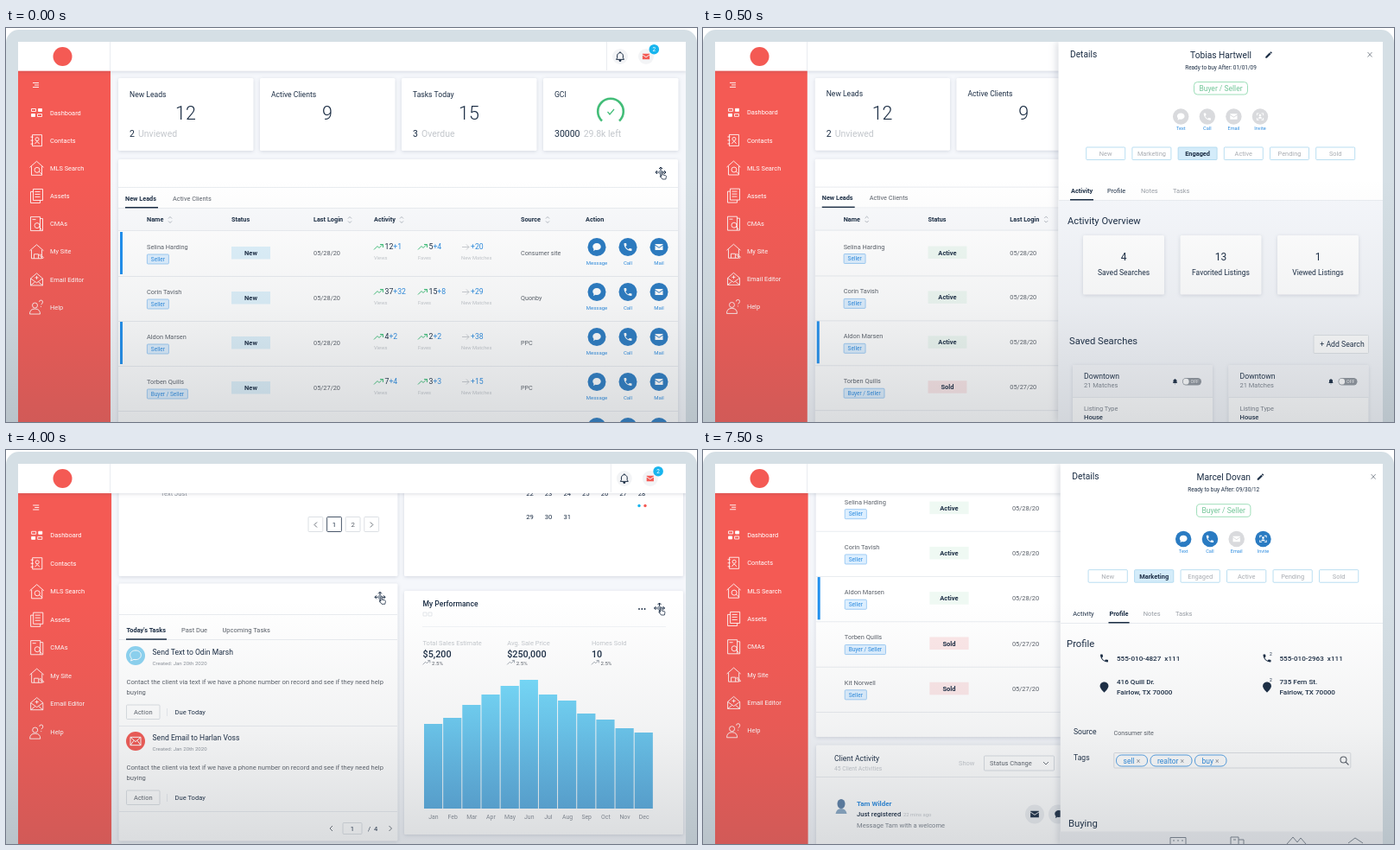
Recreate the animation shown at these times as an HTML page. Size 800x456 px, loop 8000 ms.

```html
<!DOCTYPE html>
<html lang="en">
<head>
<meta charset="utf-8">
<title>CRM dashboard</title>
<style>
  html, body { margin: 0; width: 100%; height: 100%; overflow: hidden; background: #fff; }
  svg { display: block; width: 800px; height: 456px; font-family: Roboto, sans-serif; }
  text { white-space: pre; }
  .card { filter: drop-shadow(0 1px 2px #25355528); }
  .panel { filter: drop-shadow(-2px 0 4px #25355530); }
</style>
</head>
<body>
<svg viewBox="0 0 800 456">
  <defs>
    <clipPath id="screen"><rect x="14" y="16" width="773" height="440"/></clipPath>
    <linearGradient id="shade" x2="0" y2="1">
      <stop offset=".38" stop-color="#505a64" stop-opacity="0"/>
      <stop offset=".7" stop-color="#505a64" stop-opacity=".075"/>
      <stop offset="1" stop-color="#505a64" stop-opacity=".21"/>
    </linearGradient>
    <linearGradient id="bars" gradientUnits="userSpaceOnUse" x1="0" y1="266" x2="0" y2="415">
      <stop stop-color="#76dbfb"/><stop offset="1" stop-color="#58abdf"/>
    </linearGradient>
  </defs>
  <rect y="2" width="800" height="470" rx="15" fill="#d5dfe5"/>
  <g id="stage" clip-path="url(#screen)"></g>
  <rect y="2" width="800" height="454" fill="url(#shade)"/>
</svg>
<script>
const INK = '#1b2d44', BODY = '#5a6069', PALE = '#c3c7cc', BLUE = '#2b8be0', DISC = '#2a7bc2',
      RED = '#f45a54', GREEN = '#3fbf78', EDGE = '#e9ecf0', SKY = '#a9d6ee', PAGE = '#f5f7fb';

// ---- drawing helpers ----
const text = (x, y, s, size = 7.4, fill = INK, weight = 400, anchor = 'start') =>
  `<text x="${x}" y="${y}" font-size="${size}" fill="${fill}" font-weight="${weight}" text-anchor="${anchor}">${s}</text>`;
const mid = (x, y, s, size, fill, weight) => text(x, y, s, size, fill, weight, 'middle');
const rect = (x, y, w, h, fill, more = '') =>
  `<rect x="${x}" y="${y}" width="${w}" height="${h}" fill="${fill}" ${more}/>`;
const box = (x, y, w, h, fill, stroke, rx = 1) =>
  rect(x, y, w, h, fill, `stroke="${stroke}" stroke-width=".8" rx="${rx}"`);
const card = (x, y, w, h) => rect(x, y, w, h, '#fff', 'class="card" rx="1.5"');
const disc = (x, y, r, fill) => `<circle cx="${x}" cy="${y}" r="${r}" fill="${fill}"/>`;
const line = (d, stroke = EDGE, width = 1) =>
  `<path d="${d}" fill="none" stroke="${stroke}" stroke-width="${width}"/>`;
const at = (x, y, body, k = 1) => `<g transform="translate(${x} ${y}) scale(${k})">${body}</g>`;
const zoom = (k, body, dy = 0) =>
  `<g transform="translate(14 ${16 + dy}) scale(${k}) translate(-14 -16)">${body}</g>`;
const each = (list, fn) => list.map(fn).join('');

// Icons on a 24-unit grid
const ICONS = {
  chat: 'M12 3c5.500 0 9.500 3.500 9.500 8s-4 8-9.500 8c-1 0-2-.1-3-.4L4 21l1-4.200C3.500 15 2.500 13 2.500 11 2.500 6.500 6.500 3 12 3z',
  phone: 'M6.600 10.800c1.400 2.800 3.800 5.100 6.600 6.600l2.200-2.200c.3-.3.7-.4 1-.2 1.100.4 2.300.6 3.600.6.500 0 1 .4 1 1V20c0 .5-.5 1-1 1C10.600 21 3 13.400 3 4c0-.5.5-1 1-1h3.500c.5 0 1 .5 1 1 0 1.200.2 2.400.6 3.600.1.300 0 .7-.3 1z',
  mail: 'M3 5h18v1.500l-9 6-9-6zM3 8.500l9 6 9-6V19H3z',
  envelope: 'M3 5h18v14H3zM3 5l9 8 9-8M3 19l6-8M21 19l-6-8',
  pin: 'M12 1c-5.500 0-9 4-9 8.500C3 15.500 12 23 12 23s9-7.500 9-13.500C21 5 17.500 1 12 1z',
  pencil: 'M3 17.200V21h3.800L17.800 9.900l-3.700-3.700zM20.700 7a1 1 0 0 0 0-1.400l-2.300-2.300a1 1 0 0 0-1.400 0l-1.900 1.800 3.800 3.800z',
  bell: 'M4 18h16l-2-3v-5c0-3-2.500-5-5-5.300V3h-2v1.700C8.500 5 6 7 6 10v5zM10 20h4a2 2 0 0 1-4 0z',
  invite: 'M3 3h6v2H5v4H3zM15 3h6v6h-2V5h-4zM3 15h2v4h4v2H3zM19 15h2v6h-6v-2h4zM12 6a3 3 0 1 1 0 6 3 3 0 0 1 0-6zM7 17c0-5 10-5 10 0z'
};
const icon = (name, x, y, size, fill) =>
  at(x - size / 2, y - size / 2, `<path d="${ICONS[name]}" fill="${fill}"/>`, size / 24);
const outline = (name, x, y, size, stroke) =>
  at(x - size / 2, y - size / 2, line(ICONS[name], stroke, 24 / size), size / 24);

const dragCursor = (x, y) => at(x, y,
  line('M-6 0H6M0-6V6', INK, 1.1) + line('M-4-2L-6 0l2 2M4-2L6 0 4 2M-2-4L0-6l2 2', INK, 1) +
  disc(0, 0, 2.6, '#9aa4b0') +
  '<path d="M1 0c0-1 1.600-1 1.600 0v3l3 .6q1 .4.8 1.600L5.800 8H2L-.6 4.500q.3-1.200 1.600 0z" fill="#fff" stroke="#1b2d44" stroke-width=".8"/>');

// ---- shared chrome ----
const HOUSE = 'M-8-1L0-8 8-1M-6-2V8H6V-2';
const LENS = 'M3.500 2a3 3 0 1 1-6 0 3 3 0 0 1 6 0M3 4l3 3';
const MENU = [
  ['Dashboard', 'M-6-4.500h5v3h-5zM2-4.500h4v3H2zM-6 1.500h4v3h-4zM1 1.500h5v3H1z'],
  ['Contacts', 'M-5-6.500H6v13H-5zM-7-4h3M-7 0h3M-7 4h3M2.500-1.500a2 2 0 1 1-4 0 2 2 0 0 1 4 0M-2 4q2.500-5 5 0'],
  ['MLS Search', HOUSE + LENS],
  ['Assets', 'M-4-8H7V5H-4zM-4-5h-3V8H4V5M-2-5h6M-2-2h6M-2 1h6'],
  ['CMAs', 'M-7-8H4V8H-7zM4-6h3V8H4M-5-5h4' + LENS],
  ['My Site', HOUSE + 'M-3 8V3h5v5M3 4l4 4 1-1-4-4z'],
  ['Email Editor', 'M-7-1L0-7l7 6V7H-7zM-7-1l7 5 7-5M-7 7l5-4M7 7L2 3M-2-2h4M0-4v4'],
  ['Help', 'M1-2a3 3 0 1 1-6 0 3 3 0 0 1 6 0M-8 8q0-6 6-6t6 6zM3-6q0-2 2-2t2 2-2 3M5-1v1']
];

const sidebar = k => zoom(k,
  rect(14, 49, 107, 420, RED) + line('M31 63.500h7M33 66h5M31 68.500h7', '#fff', .9) +
  each(MENU, ([name, d], i) => {
    const y = 98 + 32.15 * i;
    return at(35.5, y, line(d, '#fff', .85)) + text(51, y + 2.6, name, 7.4, '#fff') +
      (i ? '' : rect(37.5, y - 4.5, 4, 3, '#fff') + rect(29.5, y + 1.5, 4, 3, '#fff'));
  }));

const header = (k, dx = 0) =>
  rect(14, 16, 774, 33.7 * k, '#fff', 'class="card"') + line('M120.500 16v33') + disc(65.5, 33, 11, RED) +
  line(`M${695.5 + dx} 16v33`) +
  at(dx, 0, disc(711, 33, 9, '#f3f4f6') + outline('bell', 711, 33, 13.5, INK) +
    disc(741, 33, 9, '#f3f4f6') + icon('mail', 741, 33, 11, RED) +
    disc(750.3, 24.7, 5.8, '#18b5ee') + mid(750.3, 27.2, '2', 6.5, '#fff'));

const screen = (k, page, dx) => rect(14, 16, 774, 440, PAGE) + page + sidebar(k) + header(k, dx);

// ---- leads page ----
const LEADS = [
  ['Selina Harding', 'Seller', '05/28/20', 'Consumer site', 12, 1, 5, 4, 20],
  ['Corin Tavish', 'Seller', '05/28/20', 'Quonby', 37, 32, 15, 8, 29],
  ['Aldon Marsen', 'Seller', '05/28/20', 'PPC', 4, 2, 2, 2, 38],
  ['Torben Quills', 'Buyer / Seller', '05/27/20', 'PPC', 7, 4, 3, 3, 15],
  ['Kit Norwell', 'Seller', '05/27/20', 'PPC', 6, 2, 4, 1, 12]
];
const STATUS = { New: '#def1fb', Active: '#eff9f3', Sold: '#fce7e8' };
const ACTIONS = [['chat', 'Message'], ['phone', 'Call'], ['mail', 'Mail']];

const trend = (x, y, k = 1) => at(x, y, line('M0 3L4-1l2 2 4-4M7-3h3.500V.5', k < 1 ? '#8c949e' : GREEN, 1), k);
const gain = (x, y, total, plus, label) =>
  trend(x, y) + text(x + 12.5, y + 2.5, `${total}<tspan fill="${BLUE}">+${plus}</tspan>`, 8.7) +
  text(x, y + 14.5, label, 5.8, PALE);

const lead = ([name, role, date, source, views, v, faves, f, matches], i, status, marked) => {
  const tagWidth = role === 'Seller' ? 25 : 47;
  return at(0, 52 * i,
    line('M130 287.500h648') + (marked ? rect(132, 236, 3, 49, '#1f8fee') : '') +
    text(163, 256, name, 7.4, BODY) +
    box(163.4, 262, tagWidth, 11, '#ddefff', '#8cc2f3') + mid(163.4 + tagWidth / 2, 269.8, role, 6.5, BLUE) +
    rect(261, 253, 45, 14.5, STATUS[status]) + mid(283.5, 263, status, 7.5, INK, 700) +
    text(356, 263, date, 7.4, BODY) +
    gain(426, 253.5, views, v, 'Views') + gain(477, 253.5, faves, f, 'Faves') +
    line('M528 253.500h8m-3-3l3 3-3 3', PALE, .9) + text(538, 256, '+' + matches, 8.7, BLUE) +
    text(527, 268, 'New Matches', 5.8, PALE) + text(596, 263, source, 7.2, BODY) +
    each(ACTIONS, ([kind, label], n) => {
      const x = 684 + 36 * n;
      return disc(x, 253.5, 10.5, DISC) + icon(kind, x, 253.5, 12, '#fff') + mid(x, 274, label, 6, BLUE);
    }));
};

const tile = (x, title, count, extra = '', note = '') =>
  card(x, 58, 156.5, 84) + text(x + 13, 79.5, title, 8.6) + mid(x + 78, 106, count, 21.5, INK, 300) +
  text(x + 13, 126, `${extra} <tspan dx="1.5" fill="${PALE}">${note}</tspan>`, 10.5);

function leadsPage(statuses, marked) {
  const columns = [[163, 'Name', 190], [261, 'Status'], [356, 'Last Login', 398],
    [426, 'Activity', 458], [596, 'Source', 627], [671, 'Action']];
  return tile(130, 'New Leads', '12', '2', 'Unviewed') + tile(294, 'Active Clients', '9') +
    tile(458, 'Tasks Today', '15', '3', 'Overdue') + tile(622, 'GCI', '', '30000', '29.8k left') +
    line('M690 107.500A14.800 14.800 0 1 1 710 107.500', '#43bd78', 2.6) + line('M696.500 97l2.500 3 5-6', '#43bd78', 1.2) +
    card(130, 152, 648, 372) + line('M130 184.500h648M130 208.500h648') +
    text(138, 199.5, 'New Leads', 7.3, INK, 700) + text(193, 199.5, 'Active Clients', 7.4, BODY) +
    rect(138, 207, 38, 1.5, INK) + rect(130, 209, 648, 26, '#f9fafc') + line('M130 234.500h648') +
    each(columns, ([x, name, sort]) => text(x, 224, name, 7.3, INK, 700) +
      (sort ? line(`M${sort - 2} 220.500l2-2 2 2M${sort - 2} 223.500l2 2 2-2`, '#a9afb8', .9) : '')) +
    each(LEADS, (row, i) => lead(row, i, statuses[i], marked.includes(i)));
}

// ---- client panel ----
function clientPanel(name, pencilX, date, activeContacts, stage, tab) {
  const stages = ['New', 'Marketing', 'Engaged', 'Active', 'Pending', 'Sold'];
  const tabs = [['Activity', 426, 25], ['Profile', 468, 22], ['Notes', 507, 19], ['Tasks', 544, 19]];
  const contacts = [['chat', 'Text'], ['phone', 'Call'], ['mail', 'Email'], ['invite', 'Invite']];
  return rect(411.5, 16, 380, 440, '#fff', 'class="panel"') + line('M412 199.500h376') +
    text(425, 33.7, 'Details', 10.2) + mid(599.5, 34.7, name, 10.2) + icon('pencil', pencilX, 31, 10, INK) +
    line('M769.500 28l5 5.500m0-5.500l-5 5.500', '#7c848e', .9) +
    mid(599.5, 47.8, 'Ready to buy After: ' + date, 6.45) +
    box(568.5, 62.5, 62, 14.5, '#fff', '#86d6a8', 4) + mid(599.5, 72.8, 'Buyer / Seller', 8.5, '#72c698') +
    each(contacts, ([kind, label], i) => {
      const x = 553.2 + 30.6 * i;
      return disc(x, 102.5, 9.2, activeContacts.includes(i) ? DISC : '#d9dadd') +
        icon(kind, x, 102.5, 11, '#fff') + mid(x, 118.3, label, 5.6, BLUE);
    }) +
    each(stages, (s, i) => {
      const x = 466.2 + 53.2 * i, on = s === stage;
      return box(x - 22.5, 138, 45, 14.5, on ? '#d4ecfa' : '#fff', SKY) +
        mid(x, 148, s, 7.4, on ? INK : '#a7abb1', on ? 700 : 400);
    }) +
    each(tabs, ([s, x, w], i) => text(x, 190.7, s, 7.4, i < 2 ? INK : '#989da5', s === tab ? 700 : 400) +
      (s === tab ? rect(x - 1, 198, w + 2, 1.5, INK) : ''));
}

const savedSearch = x => card(x, 390, 162, 90) + rect(x, 390, 162, 37, '#f7f8fb') + line(`M${x} 427.500h162`) +
  text(x + 13, 405.5, 'Downtown', 8.7) + text(x + 13, 416, '21 Matches', 7.5, '#7b828c') +
  icon('bell', x + 118.5, 409, 8, INK) + rect(x + 127, 405, 22, 8.5, '#8f959d', 'rx="4.2"') +
  disc(x + 131.2, 409.2, 3.4, '#fff') + text(x + 136.5, 411.4, 'OFF', 5.3, '#fff') +
  text(x + 13, 442.5, 'Listing Type', 7.4, '#7b828c') + text(x + 13, 453, 'House', 7.6, INK, 500);

const activityTab = () =>
  rect(411.5, 200, 380, 256, PAGE) + text(422, 226.5, 'Activity Overview', 11.2) +
  each([['4', 'Saved Searches'], ['13', 'Favorited Listings'], ['1', 'Viewed Listings']], ([n, label], i) => {
    const x = 440 + 112.5 * i;
    return card(x, 240, 94, 68.5) + mid(x + 47, 269, n, 12) + mid(x + 47, 286, label, 8.5);
  }) +
  text(424, 365.5, 'Saved Searches', 11.2) + box(707, 355.5, 63.5, 21, '#fff', '#d9dde2') + mid(740, 369.3, '+ Add Search', 8.7) +
  savedSearch(428) + savedSearch(608.5);

const contactCard = (x, phone, street) =>
  icon('phone', x, 241, 12, INK) + text(x + 14.5, 244, phone + '&#160; x111', 8.1, INK, 500) +
  icon('pin', x, 274.5, 13, INK) + text(x + 14.5, 271, street, 8.1, INK, 500) +
  text(x + 14.5, 283, 'Fairlow, TX 70000', 8.1, INK, 500);

const profileTab = () =>
  text(421, 228, 'Profile', 11.3) +
  contactCard(464.5, '555-010-4827', '416 Quill Dr.') + contactCard(653, '555-010-2963', '735 Fern St.') +
  text(656, 237.5, '2', 5) + text(656, 267.5, '2', 5) +
  text(429, 329, 'Source', 8.6) + text(475.5, 329.5, 'Consumer site', 7.2, BODY) +
  text(429, 359, 'Tags', 8.6) + box(475.8, 350.5, 274, 17.5, '#fff', '#d5d9de') +
  each([['sell', 478.5, 36], ['realtor', 518, 48], ['buy', 569.5, 36.5]], ([s, x, w]) =>
    box(x, 353, w, 13, '#fff', BLUE, 6) +
    text(x + 8, 362.5, `${s} <tspan fill="#8d939b">×</tspan>`, 8.5, BLUE)) +
  line('M745 358.500a3.500 3.500 0 1 1-7 0 3.500 3.500 0 0 1 7 0M744 361l3.500 3.500', BODY, 1.1) +
  text(423, 435.5, 'Buying', 11.3) + rect(413, 441.5, 375, 15, '#f1f2f5') +
  line('M541 456v-7.500h18v7.500M544 452h2m3 0h2m3 0h2M611 456v-8h9v8m0-5h6v5M614 451h3M676 456l7-8 5 6 4-5 6 7M747 455l8-6 9 6', '#7a838e', 1);

const clientActivity = () =>
  card(131, 341.5, 320, 130) + text(152, 360, 'Client Activity', 8.6) + text(152, 371, '45 Client Activities', 6.7, PALE) +
  text(296, 365.3, 'Show', 7.5, PALE) + box(325.5, 354, 81, 17, '#fff', '#d0d5db') +
  text(332, 365.3, 'Status Change', 7.5, BODY) + line('M394 361l3 3 3-3', BODY, .9) + line('M131 378.500h290') +
  `<ellipse cx="160" cy="409.500" rx="4.500" ry="5.500" fill="#5c7fa6"/><path d="M153.500 421q1-6 6.500-6t6.500 6z" fill="#8aa9c6"/>` +
  text(178, 412, 'Tam Wilder', 8, BLUE, 700) + text(178, 424, 'Just registered', 7.6, INK, 500) +
  text(232, 423.6, '22 mins ago', 5.9, PALE) + text(178, 436.7, 'Message Tam with a welcome', 7.6, '#7b828c') +
  disc(384, 421.5, 11, '#eceef1') + icon('mail', 384, 421.5, 13, INK) +
  disc(411, 421.5, 11, '#eceef1') + icon('chat', 412, 421.5, 12, INK);

// ---- tasks and performance page ----
const task = (dy, color, kind, title) => at(0, dy,
  disc(150, 238, 11, color) + outline(kind, 150, 238, 16, '#fff') +
  text(169.5, 236.8, title, 8.6) + text(169.5, 248.8, 'Created: Jan 20th 2020', 6.1, '#8d939b') +
  text(139.5, 270.5, 'Contact the client via text if we have a phone number on record and see if they need help', 7.6, BODY) +
  text(139.5, 282.5, 'buying', 7.6, BODY) +
  box(139.5, 295, 38.5, 16.5, '#fff', '#d3d8de') + mid(158.8, 305.8, 'Action', 7.5, BODY) +
  line('M186.500 299v9') + text(195.5, 305.8, 'Due Today', 7.6) + line('M131 319.500h322'));

function tasksPage() {
  const tops = [317, 310, 295, 283, 273, 266, 283, 290, 305, 312, 322, 327];
  const months = 'Jan Feb Mar Apr May Jun Jul Aug Sep Oct Nov Dec'.split(' ');
  const totals = [['Total Sales Estimate', '$5,200'], ['Avg. Sale Price', '$250,000'], ['Homes Sold', '10']];
  return card(130.5, 20, 323, 126) + card(461, 20, 323, 126) + card(130.5, 154.5, 323, 298) + card(461, 163, 323, 282) +
    text(179, 53, 'Text Just', 7.5, '#8d939b') +
    each(['', '1', '2', ''], (s, i) => box(350 + 21.6 * i, 77.5, 16.8, 17, '#fff', i === 1 ? INK : '#d3d8de') +
      mid(358.4 + 21.6 * i, 88.8, s, 7.8, i === 1 ? INK : BODY)) +
    line('M360 83.500l-3 3 3 3M421.800 83.500l3 3-3 3', BODY, .9) +
    each([...Array(10).keys()], i => mid(606.5 + 21.6 * (i % 7), i < 7 ? 53 : 80, 22 + i, 7.6, INK)) +
    disc(733, 64.5, 1.7, '#18b5ee') + disc(740, 64.5, 1.7, RED) +
    line('M131 190.500h322M131 219.500h322') + dragCursor(433, 170.3) +
    text(139.5, 211, "Today's Tasks", 7.4, INK, 700) + text(203, 211, 'Past Due', 7.5, BODY) +
    text(250.5, 211, 'Upcoming Tasks', 7.5, BODY) + rect(139, 218.3, 47, 1.5, INK) +
    task(0, '#8dd3f1', 'chat', 'Send Text to Odin Marsh') + task(99, RED, 'envelope', 'Send Email to Harlan Voss') +
    line('M378 435l-3 3 3 3M443.500 435l3 3-3 3', BODY, .9) + box(390, 431.5, 22, 13, '#fff', '#d3d8de') +
    mid(401, 440.7, '1', 7.6) + text(419, 440.7, '/&#160; 4', 7.6) +
    text(482.5, 181, 'My Performance', 8.6, INK, 500) + line('M483 188h4v4h-4zM489 188h4v4h-4z', '#dde1e6', .8) +
    line('M482 204.500h282', '#f1f3f6') + each([733, 736.3, 739.6], x => disc(x, 184, .9, INK)) + dragCursor(756.5, 183) +
    each(totals, ([label, value], i) => {
      const x = 482.5 + 97.7 * i;
      return text(x, 226, label, 7.5, PALE) + text(x, 239.5, value, 10.8, INK, 500) +
        trend(x, 246, .8) + text(x + 10.5, 248.5, '2.5%', 6.1, BODY);
    }) +
    each(tops, (top, i) => rect(484 + 22.15 * i, top, 21.2, 415 - top, 'url(#bars)') +
      mid(495 + 22.15 * i, 426.5, months[i], 6.9, '#858b94'));
}

// ---- timeline ----
const LOOP = 8000;
const updated = ['Active', 'Active', 'Active', 'Sold', 'Sold'];
const scenes = [
  { from: 0, art: screen(1, leadsPage(Array(5).fill('New'), [0, 2]) + dragCursor(758, 167)) },
  { from: 500, art: screen(.998, zoom(.998, leadsPage(updated, [2]))) +
      clientPanel('Tobias Hartwell', 655, '01/01/09', [], 'Engaged', 'Activity') + activityTab() },
  { from: 4000, art: screen(1.01, tasksPage(), 4.8) },
  { from: 7500, art: screen(1.0055, zoom(1.0055, leadsPage(updated, [2]), -194.7) + clientActivity()) +
      zoom(1.0055, clientPanel('Marcel Dovan', 642, '09/30/12', [0, 1, 3], 'Marketing', 'Profile')) + profileTab() }
];

const stage = document.getElementById('stage');
let shown;
function play() {
  const now = performance.now() % LOOP;
  const scene = scenes.findLast(s => s.from <= now);
  if (scene !== shown) stage.innerHTML = (shown = scene).art;
  requestAnimationFrame(play);
}
play();
</script>
</body>
</html>
```
